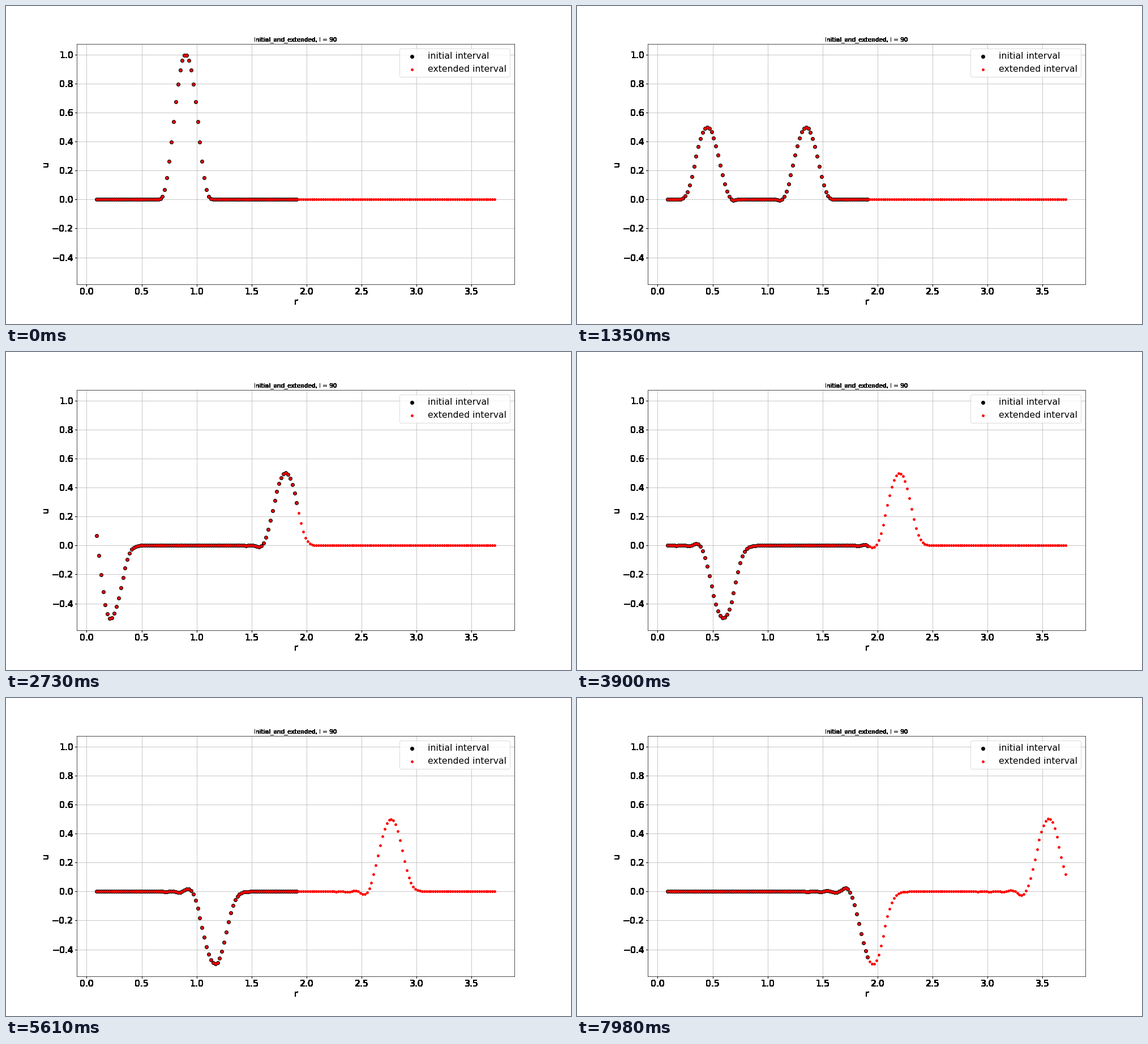
Animation of 998 by 561 pixels, one loop 8000 ms. Source, as a matplotlib script:

```python
import numpy as np
import matplotlib.pyplot as plt
from matplotlib.animation import FuncAnimation

WIDTH, HEIGHT, DPI = 998, 561, 72
S = WIDTH / 16 / DPI            # layout designed for a 16 x 9 inch figure

FRAMES, LOOP_MS = 267, 8000
N = 90                          # cells in the initial interval
H, TAU = 0.02, 0.01             # grid and time steps
INNER, OUTER = N + 2, 2 * N + 2

plt.rcParams.update({
    'font.family': 'DejaVu Sans',
    'font.size': 18 * S,
    'axes.titlesize': 12 * S,
    'axes.labelsize': 18 * S,
    'xtick.labelsize': 18 * S,
    'ytick.labelsize': 18 * S,
    'legend.fontsize': 18 * S,
    'axes.titlepad': 6 * S,
    'axes.labelpad': 4 * S,
    'axes.linewidth': 0.8 * S,
    'lines.linewidth': 1.5 * S,
    'patch.linewidth': 1.0 * S,
})
for axis in ('xtick', 'ytick'):
    plt.rcParams[axis + '.major.size'] = 3.5 * S
    plt.rcParams[axis + '.major.pad'] = 3.5 * S
    plt.rcParams[axis + '.major.width'] = 0.8 * S


def bump(r, center=0.9, radius=0.3):
    """Smooth compact pulse of height 1."""
    x2 = (r - center) ** 2
    inside = x2 < radius ** 2
    gap = np.where(inside, radius ** 2 - x2, 1.0)
    return np.where(inside, np.exp(-4 * x2 / gap), 0.0)


def laplacian(u):
    out = np.zeros_like(u)
    out[1:-1] = u[2:] - 2 * u[1:-1] + u[:-2]
    return out


def solve(r, steps):
    """Leapfrog wave equation, u = 0 midway between the first two nodes."""
    cfl2 = (TAU / H) ** 2
    prev = bump(r)
    cur = prev + 0.5 * cfl2 * laplacian(prev)
    layers = [prev]
    while len(layers) < steps:
        cur[0] = -cur[1]
        layers.append(cur)
        prev, cur = cur, 2 * cur - prev + cfl2 * laplacian(cur)
    return np.array(layers)


def harden(img, dpi):
    """Turn every touched pixel solid black, for jagged heavy lettering."""
    out = np.zeros_like(img)
    out[..., 3] = img[..., 3] > 0.01
    return out, 0, 0


# The grid runs past the visible part so that the pulse leaves freely.
r = 0.1 - H / 2 + H * np.arange(OUTER + 80)
waves = solve(r, FRAMES)

fig = plt.figure(figsize=(WIDTH / DPI, HEIGHT / DPI), dpi=DPI, facecolor='white')
ax = fig.add_axes([0.125, 0.125, 0.775, 0.755])

xticks = np.arange(8) / 2
yticks = np.arange(-2, 6) / 5
grid = dict(color='#b0b0b0', lw=0.8 * S, zorder=0.5)
for x in xticks:
    ax.axvline(x, **grid)
for y in yticks:
    ax.axhline(y, **grid)


def dots(count, color, area, label):
    return ax.scatter(r[:count], waves[0, :count], s=area * S * S,
                      color=color, label=label)


inner = dots(INNER, 'black', 50, 'initial interval')
outer = dots(OUTER, 'red', 20, 'extended interval')

ax.set_xticks(xticks)
ax.set_yticks(yticks)
margin = 0.05 * (r[OUTER - 1] - r[0])
ax.set_xlim(r[0] - margin, r[OUTER - 1] + margin)
ax.set_ylim(-0.585, 1.072)
ax.set_xlabel('r')
ax.set_ylabel('u')
ax.set_title(f'Initial_and_extended, I = {N}')
ax.legend(loc='upper right')
for item in (ax.xaxis, ax.yaxis, ax.title):
    item.set_agg_filter(harden)


def update(k):
    for points, count in ((inner, INNER), (outer, OUTER)):
        points.set_offsets(np.column_stack((r[:count], waves[k, :count])))
    return inner, outer


anim = FuncAnimation(fig, update, frames=FRAMES, interval=LOOP_MS / FRAMES,
                     init_func=lambda: update(0), repeat=True, repeat_delay=0)
plt.show()
```
